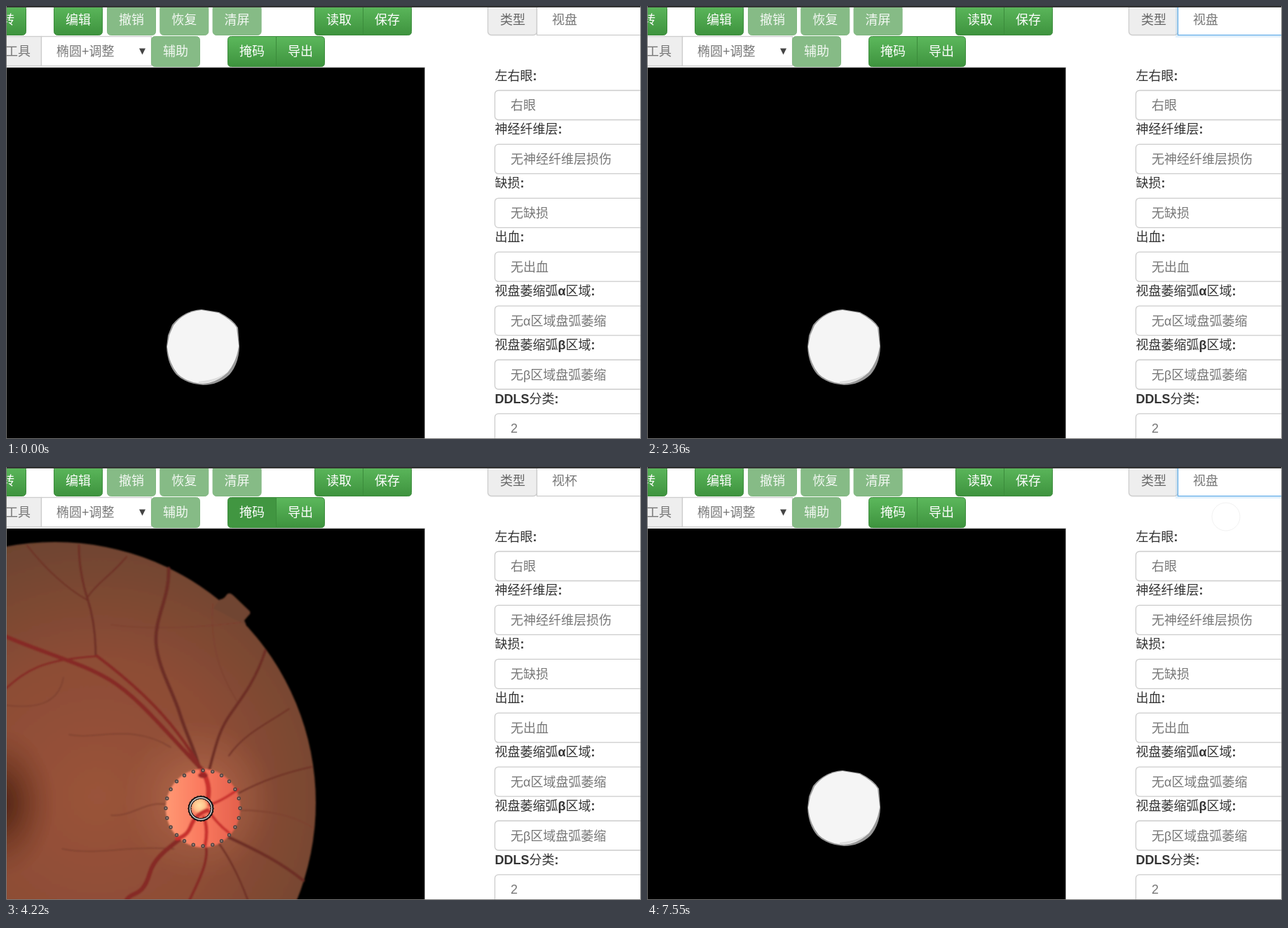
An HTML page for the animation above (8 s loop, 906 by 618 pixels).

```html
<!DOCTYPE html>
<html lang="zh-CN">
<head>
<meta charset="utf-8">
<style>
  html, body { margin: 0; width: 100%; height: 100%; overflow: hidden; background: #fff; }
  svg { display: block; font: 300 18px "Liberation Sans", "Noto Sans CJK SC", "Noto Sans CJK", sans-serif; }
  .label { font-weight: 400; fill: #333; }
  .label tspan { font-weight: 700; }
  .value { fill: #777; }
  .vessels path { fill: none; stroke-linecap: round; }
</style>
</head>
<body>
<svg id="stage" width="906" height="618" viewBox="0 0 906 618">
  <defs>
    <linearGradient id="green" x2="0" y2="1">
      <stop stop-color="#5cb85c"/><stop offset="1" stop-color="#3e933e"/>
    </linearGradient>
    <radialGradient id="retina" gradientUnits="userSpaceOnUse" cx="130" cy="470" r="390">
      <stop stop-color="#9a533a"/><stop offset=".5" stop-color="#8d4d36"/><stop offset="1" stop-color="#6b432f"/>
    </radialGradient>
    <radialGradient id="macula">
      <stop stop-color="#4b2012"/><stop offset=".35" stop-color="#5c2a18" stop-opacity=".75"/>
      <stop offset="1" stop-color="#7a3a24" stop-opacity="0"/>
    </radialGradient>
    <radialGradient id="halo">
      <stop offset=".3" stop-color="#b0664a" stop-opacity=".8"/><stop offset="1" stop-color="#a05c42" stop-opacity="0"/>
    </radialGradient>
    <linearGradient id="disc">
      <stop stop-color="#ff9873"/><stop offset=".45" stop-color="#fb7b60"/><stop offset="1" stop-color="#e4604c"/>
    </linearGradient>
    <radialGradient id="cup">
      <stop stop-color="#ffe2a6"/><stop offset=".6" stop-color="#ffc08a"/><stop offset="1" stop-color="#ff9a70" stop-opacity="0"/>
    </radialGradient>
    <filter id="soft" x="-5%" y="-5%" width="110%" height="110%"><feGaussianBlur stdDeviation=".8"/></filter>
    <clipPath id="view"><path d="M1 88H597V617H1Z"/></clipPath>
  </defs>

  <g id="ui"></g>

  <path d="M0 87.500H598V618H0Z" fill="#999"/>
  <path d="M0 88H597V618H0Z"/>
  <g clip-path="url(#view)">
    <g id="eye">
      <g filter="url(#soft)">
        <circle cx="70" cy="479" r="372" fill="url(#retina)"/>
        <path d="M296 202L305 189Q311 189 315 182Q319 178 324 183L346 204Q351 208 346 212L340 219L343 226Z" fill="#704531"/>
        <ellipse cx="-12" cy="480" rx="85" ry="110" fill="url(#macula)"/>
        <ellipse cx="275" cy="475" rx="110" ry="115" fill="url(#halo)"/>
        <g id="vessels" class="vessels"></g>
        <ellipse cx="281" cy="487" rx="53" ry="56" fill="url(#disc)"/>
        <circle cx="276" cy="483" r="14" fill="url(#cup)"/>
        <g id="discVessels" class="vessels"></g>
      </g>
      <g id="markers"></g>
    </g>
    <g id="bigMask">
      <path d="M279 433L304 437Q324 447 331 459L333 486Q332 511 319 526Q303 541 281 541Q256 539 243 526Q230 511 229 486L231 470L237 455Q253 435 279 433Z" fill="#999"/>
      <path d="M279 434L303 438Q322 448 329 459L332 485Q329 508 316 523Q300 538 280 539Q257 537 245 525Q232 509 230 486L233 470L239 456Q254 436 279 434Z" fill="#f5f5f5"/>
      <path d="M275 539Q304 537 320 519Q306 533 275 536Z" fill="#ddd"/>
    </g>
    <g id="smallMask">
      <ellipse cx="286" cy="485" rx="17.500" ry="16" transform="rotate(-25 286 485)" fill="#aaa"/>
      <ellipse cx="280" cy="487" rx="17" ry="15.500" fill="#999"/>
      <ellipse cx="280" cy="487" rx="15.500" ry="14.500" fill="#f5f5f5"/>
    </g>
  </g>

  <g id="popup">
    <path d="M758.500 43.500H908V81.500H758.500Z" fill="#fff" stroke="#aaa"/>
    <rect id="highlight" x="759" width="150" height="19" fill="#1e90ff"/>
    <text id="option0" x="779" y="59.500">视盘</text>
    <text id="option1" x="779" y="78.500">视杯</text>
  </g>
  <circle id="ripple"/>
  <path d="M0 1H906" stroke="#333" stroke-width="2"/>
  <path d="M.5 0V617.500H905.500V0" fill="none" stroke="#777"/>
</svg>

<script>
const $ = id => document.getElementById(id);
const set = (id, attrs) => { for (const k in attrs) $(id).setAttribute(k, attrs[k]); };
const show = (id, on) => set(id, { visibility: on ? 'visible' : 'hidden' });

const text = (x, y, s, extra = 'class="value"') => `<text x="${x}" y="${y}" ${extra}>${s}</text>`;
const box = (x, y, w, h, attrs) => `<rect x="${x + .5}" y="${y + .5}" width="${w - 1}" height="${h - 1}" ${attrs}/>`;
const plain = 'fill="#fff" stroke="#ccc" stroke-width="1.300"';
const grey = 'fill="#eee" stroke="#ccc" stroke-width="1.300"';

const caption = (x, y, label, color = '#fff') => text(x + 17, y + 28, label, `fill="${color}"`);

function button(x, y, label, off) {
  const paint = off ? 'fill="#86bb86" stroke="#80b780"' : 'fill="url(#green)" stroke="#3b8b3b"';
  return box(x, y, 70, 44, `rx="5" ${paint}`) + caption(x, y, label, off ? '#f3f8f3' : '#fff');
}

// Two joined buttons, rounded only at the outer corners
function buttonPair(x, y, left, right, id) {
  const half = (from, dir, name) =>
    `<path id="${name}" d="M${from + 69 * dir} ${y + .5}H${from + 5 * dir}q${-5 * dir} 0 ${-5 * dir} 5v33` +
    `q0 5 ${5 * dir} 5H${from + 69 * dir}Z" fill="url(#green)" stroke="#3b8b3b"/>`;
  return half(x + .5, 1, id) + half(x + 138.5, -1, id + 'Right') + caption(x, y, left) + caption(x + 69, y, right);
}

const fields = [
  ['左右眼:', '右眼'], ['神经纤维层:', '无神经纤维层损伤'], ['缺损:', '无缺损'], ['出血:', '无出血'],
  ['视盘萎缩弧α区域:', '无α区域盘弧萎缩'], ['视盘萎缩弧β区域:', '无β区域盘弧萎缩'], ['DDLS分类:', '2']
];
const boldLatin = s => s.replace(/[A-Zαβ:]+/g, '<tspan>$&</tspan>');

$('ui').innerHTML =
  button(-41, -2, '') + text(-6, 26, '转', 'fill="#fff"') + button(68, -2, '编辑') +
  ['撤销', '恢复', '清屏'].map((s, i) => button(144 + 75.3 * i, -2, s, true)).join('') +
  buttonPair(440, -2, '读取', '保存', 'fileButton') +
  box(-9, 43, 60, 43, grey) + text(-1, 71, '工具', 'fill="#777"') +
  box(50, 43, 158, 43, plain) + text(72, 71, '椭圆+调整') +
  '<path d="M190 60.500H199L194.500 69.500Z" fill="#444"/>' +
  button(207, 43, '辅助', true) + buttonPair(316, 43, '掩码', '导出', 'maskButton') +
  '<path id="pressed" d="M318 85V45H384" fill="none" stroke="#2f7a2f" stroke-width="3" opacity=".6"/>' +
  box(687, -8, 71, 50, `rx="5" ${grey}`) + text(705, 26, '类型', 'fill="#666"') +
  '<path id="glow" d="M756.500 -8V42.500H910" fill="none" stroke="#66afe9" stroke-width="5" opacity=".18"/>' +
  box(757, -8, 170, 50, 'id="select" fill="#fff"') + text(779, 26, '', 'id="type" class="value"') +
  fields.map(([label, value], i) =>
    text(697.5, 105.5 + 76.9 * i, boldLatin(label), 'class="label"') +
    box(697, 120 + 76.9 * i, 230, 43, `rx="5" ${plain}`) +
    text(720, 148 + 76.9 * i, value)).join('');

const paths = (color, list) => list.map(([w, d]) => `<path d="${d}" stroke="${color}" stroke-width="${w}"/>`).join('');

$('vessels').innerHTML =
  paths('#7d3f2e', [
    [1.5, 'M0 340C40 345 75 340 82 300'],
    [1.5, 'M80 545C130 555 170 540 240 545'],
    [1.5, 'M150 497C180 500 200 475 232 482'],
    [1.5, 'M90 382C130 390 180 365 235 400'],
    [1.5, 'M335 490Q400 490 438 515'],
    [1.5, 'M295 195C290 270 315 310 330 335'],
    [1.5, 'M150 225Q220 235 335 222']
  ]) +
  paths('#6d2e25', [
    [3, 'M128 270C128 235 122 205 116 187S104 140 104 112'],
    [2, 'M116 190C90 175 60 150 30 112'],
    [2, 'M117 185C130 165 150 155 172 128'],
    [5, 'M232 145C234 185 212 215 214 250S238 320 248 352S268 400 276 430'],
    [4, 'M370 262C358 300 340 325 322 350S300 395 290 432'],
    [2, 'M404 345C375 365 340 380 318 412'],
    [4.5, 'M305 522C340 540 380 555 424 590'],
    [2.5, 'M302 535Q325 565 345 618'],
    [2, 'M333 465Q380 440 436 428']
  ]) +
  paths('#862c26', [
    [6, 'M0 242C60 268 110 280 150 305S225 375 280 432'],
    [4.5, 'M130 270C170 300 215 340 245 380S270 420 282 436'],
    [3, 'M0 316C30 290 50 275 130 270'],
    [6.5, 'M272 505C255 535 215 545 205 580S180 605 172 618'],
    [4, 'M284 535C292 560 275 590 262 618']
  ]);

$('discVessels').innerHTML = paths('#c9302f', [
  [7, 'M280 434Q292 452 288 474'],
  [4, 'M290 482Q306 478 331 460'],
  [6, 'M287 490Q270 496 264 512T244 530'],
  [5, 'M282 500Q289 515 284 540'],
  [4, 'M290 492Q302 510 318 522']
]) + '<ellipse cx="281" cy="440" rx="7" ry="4" fill="#9c2828"/>';

const ring = (n, cx, cy, rx, ry, r, attrs) => Array.from({ length: n }, (_, i) => {
  const a = i / n * 2 * Math.PI;
  return `<circle cx="${cx + rx * Math.cos(a)}" cy="${cy + ry * Math.sin(a)}" r="${r}" ${attrs}/>`;
}).join('');

$('markers').innerHTML =
  ring(24, 281, 487, 53, 54, 2, 'fill="#a08078" stroke="#4a4442" stroke-width="1.400"') +
  '<circle cx="278" cy="487.500" r="16" fill="none" stroke="#111" stroke-width="4"/>' +
  ring(24, 278, 487.5, 16, 16, 2.2, 'fill="#222" stroke="#111"') +
  '<circle cx="278" cy="487.500" r="15.500" fill="none" stroke="#ddd" stroke-width="1.400"/>';

// Click ripples: start, end, x, y, radius, ring width (0 = filled), opacity
const ripples = [
  [500, 630, 344, 72, 24, 0, .1],
  [1180, 1330, 362, 76, 32, 0, .2],
  [3190, 4090, 822, 51, 23, 4, .09],
  [4090, 4220, 343, 72, 25, 0, .1],
  [4900, 5050, 358, 64, 28, 0, .25],
  [5670, 5830, 808, -20, 22, 2, .1],
  [6890, 7030, 827, -6, 25, 2, .1],
  [7550, 8000, 826, 71, 20, 1, .1]
];

function draw(t) {
  const within = (...spans) => spans.some(([a, b]) => t >= a && t < b);
  const cupType = within([3190, 7550]);
  const eye = within([500, 1180], [4090, 4900]);
  show('eye', eye);
  show('bigMask', !eye && !cupType);
  show('smallMask', !eye && cupType);

  const held = within([500, 2360], [4090, 5830]);
  set('maskButton', { fill: held ? '#419641' : 'url(#green)' });
  show('pressed', within([500, 630], [4090, 4220]));

  const focus = within([2360, 4090], [5830, 6350], [7030, 8000]);
  set('select', { stroke: focus ? '#66afe9' : within([4090, 4220]) ? '#a5bacb' : '#ccc', 'stroke-width': 1.3 });
  show('glow', focus);
  $('type').textContent = cupType ? '视杯' : '视盘';

  const row = +within([3040, 7280]);
  show('popup', within([2510, 3190], [5830, 6210], [7030, 7550]));
  set('highlight', { y: 44 + 19 * row });
  [0, 1].forEach(i => set('option' + i, { fill: i === row ? '#fff' : '#555' }));

  const hit = ripples.find(([a, b]) => within([a, b]));
  show('ripple', hit);
  if (hit) {
    const [, , cx, cy, r, width, opacity] = hit;
    set('ripple', { cx, cy, r, opacity, fill: width ? 'none' : '#888', stroke: '#777', 'stroke-width': width });
  }
}

const start = performance.now();
function tick() {
  draw((performance.now() - start) % 8000);
  requestAnimationFrame(tick);
}
tick();
</script>
</body>
</html>
```
